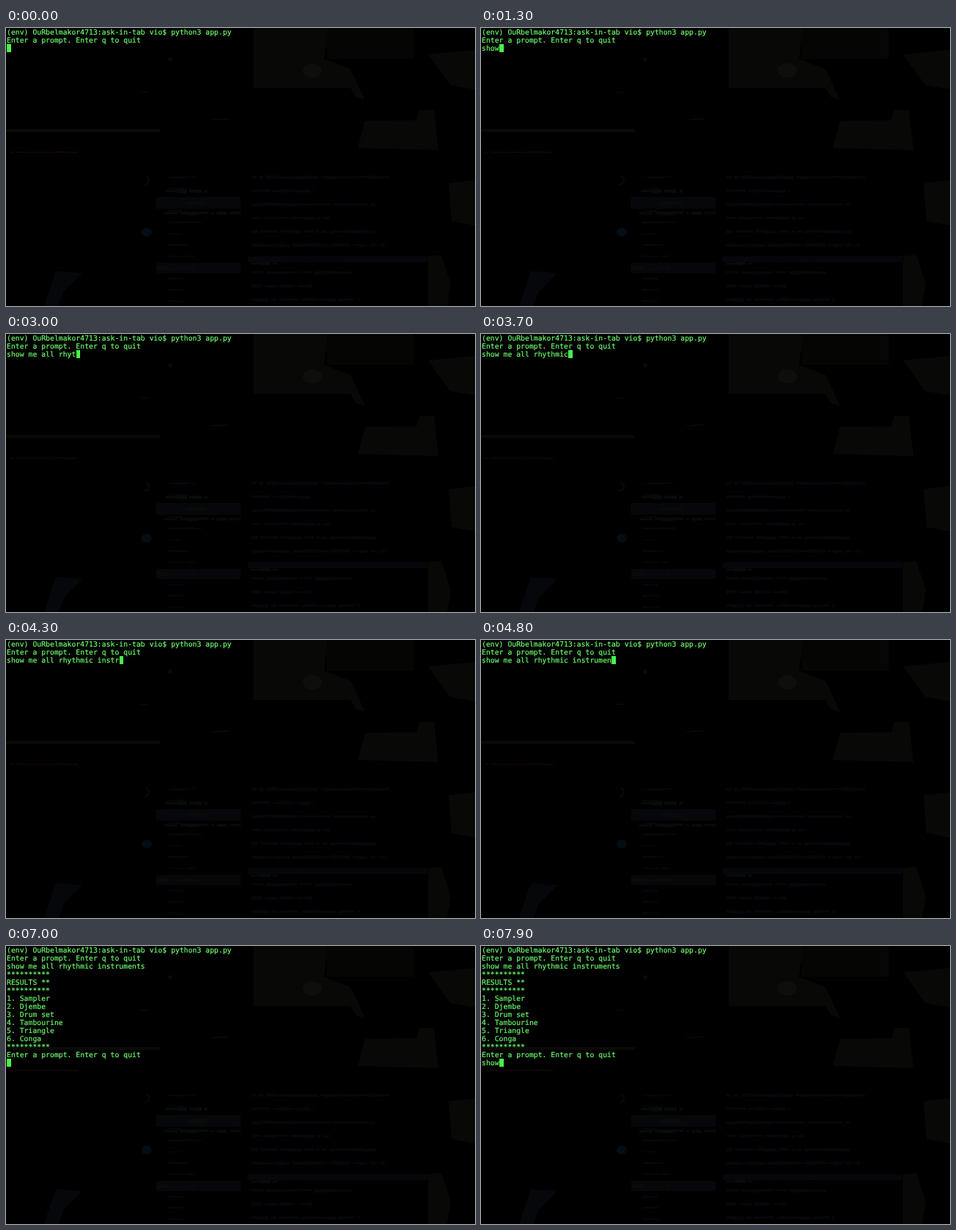
These frames come from a looping animation (640x380 px, 8000 ms). An HTML page with a canvas:

```html
<!DOCTYPE html>
<html lang="en">
<head>
<meta charset="utf-8">
<title>Terminal session</title>
<style>
  html, body { margin: 0; width: 100%; height: 100%; overflow: hidden; background: #000; }
  #stage { position: relative; width: 640px; height: 380px; overflow: hidden; background: #000; }
  canvas { position: absolute; left: 0; top: 0; }
  #term {
    position: absolute; left: 1px; top: 1px; margin: 0;
    font: 9.8px/11px "DejaVu Sans Mono", "Liberation Mono", monospace;
    text-rendering: geometricPrecision;
    font-variant-ligatures: none;
    color: #6cfa6c;
    -webkit-text-stroke: 0.2px #6cfa6c;
  }
  #cursor {
    position: absolute; width: 5.6px; height: 10.5px;
    background: linear-gradient(90deg, #3ce83c, #52ff52);
  }
</style>
</head>
<body>
<div id="stage">
  <canvas id="back" width="640" height="380"></canvas>
  <div id="cursor"></div>
  <pre id="term"></pre>
</div>
<script>
const LOOP = 8000, TICK = 100, CELL = 5.9, ROW = 11;
const $ = id => document.getElementById(id);
const term = $('term'), cursor = $('cursor');

// Dim desktop showing through the terminal
const ctx = $('back').getContext('2d');
let seed = 7;
const rnd = () => (seed = seed * 16807 % 2147483647) / 2147483647;

function poly(color, points) {
  ctx.fillStyle = color;
  ctx.fill(new Path2D('M' + points + 'Z'));
}
function oval(color, x, y, rx, ry) {
  ctx.fillStyle = color;
  ctx.beginPath();
  ctx.ellipse(x, y, rx, ry, 0, 0, 7);
  ctx.fill();
}
function bar(color, x, y, w, h) {
  ctx.fillStyle = color;
  ctx.fillRect(x, y, w, h);
}
// A smudged line of unreadable words
function smudge(color, x, y, w, h = 4) {
  for (let dx = 0; dx < w;) {
    const len = Math.min(4 + rnd() * 14, w - dx);
    const tall = h * (0.5 + rnd() * 0.5);
    bar(color, x + dx, y + rnd() - 0.5 - tall / 2, len, tall);
    dx += len + (rnd() < 0.3 ? 3 : -1);
  }
}

function drawBack() {
  const olive = '#080906', blue = '#05070b', grey = '#090a0a', red = '#0f0505';

  // Pale shapes on the right
  poly(olive, '338 0H440L434 42 470 56 490 98 478 95 470 82H338');
  bar('#050604', 438, 0, 118, 42);
  oval('#0e0f0c', 418, 58, 13, 10);
  poly(olive, '576 36L640 30V84L606 78');
  poly(olive, '480 164L490 127 560 126 564 112H584L590 167');
  poly(olive, '604 212L640 208V270L608 264');
  poly(olive, '576 312L594 310 607 350 602 380H576');
  poly(blue, '68 332L104 335 78 362 72 380H52');

  // Stray lines on the left
  bar('#0a0a06', 0, 138, 210, 4);
  smudge(red, 6, 170, 92, 3);
  smudge(grey, 280, 125, 24, 2);
  smudge(grey, 183, 88, 11, 2);
  oval(grey, 224, 43, 3, 3);
  oval('#050d13', 192, 279, 7, 6);
  ctx.strokeStyle = grey;
  ctx.lineWidth = 2;
  ctx.beginPath();
  ctx.arc(189, 208, 6, -1.3, 1.6);
  ctx.stroke();

  // Two panels of text
  bar(blue, 205, 231, 115, 16);
  bar(blue, 205, 321, 115, 14);
  bar(blue, 330, 312, 245, 8);
  smudge(grey, 218, 223, 57, 6);
  smudge(grey, 246, 240, 28, 6);
  smudge(grey, 216, 253, 104, 5);
  smudge(grey, 206, 328, 50, 6);
  smudge(grey, 334, 322, 36, 4);
  for (let y = 204; y < 380; y += 15.4) smudge(blue, 220, y, 20 + rnd() * 30, 3);
  for (let y = 204; y < 380; y += 18.6) smudge(blue, 335, y, 80 + rnd() * 110, 5);
}
drawBack();

// Terminal contents
const intro = '(env) OuRbelmakor4713:ask-in-tab vio$ python3 app.py\n';
const ask = 'Enter a prompt. Enter q to quit\n';
const stars = '*'.repeat(10) + '\n';
const items = ['Sampler', 'Djembe', 'Drum set', 'Tambourine', 'Triangle', 'Conga'];
const results = stars + 'RESULTS **\n' + stars +
  items.map((name, i) => `${i + 1}. ${name}\n`).join('') + stars + ask;

// One key per tick; a dot is a tick's pause
const first = 's...ho.w me .all. r.h.y.th.m.i.c instru.ment.s';
const second = 'show';
const FIRST = 6, ENTER = 54, ANSWER = 60, SECOND = 75;
const typed = (keys, start, t) =>
  keys.slice(0, Math.max(0, Math.floor(t - start) + 1)).replaceAll('.', '');

function screen(t) {
  let text = intro + ask + typed(first, FIRST, t);
  if (t >= ENTER) text += '\n';
  if (t >= ANSWER) text += results + typed(second, SECOND, t);
  return text;
}
// The cursor blinks off just before each round of typing
const hidden = t => t >= 3 && t < FIRST || t >= 73 && t < SECOND;

let shown = '';
function frame() {
  const t = performance.now() % LOOP / TICK;
  const text = screen(t);
  if (text !== shown) {
    term.textContent = shown = text;
    const lines = text.split('\n');
    cursor.style.left = 1.4 + lines.at(-1).length * CELL + 'px';
    cursor.style.top = (lines.length - 1) * ROW + 'px';
  }
  cursor.style.visibility = hidden(t) ? 'hidden' : 'visible';
  requestAnimationFrame(frame);
}
frame();
</script>
</body>
</html>
```
